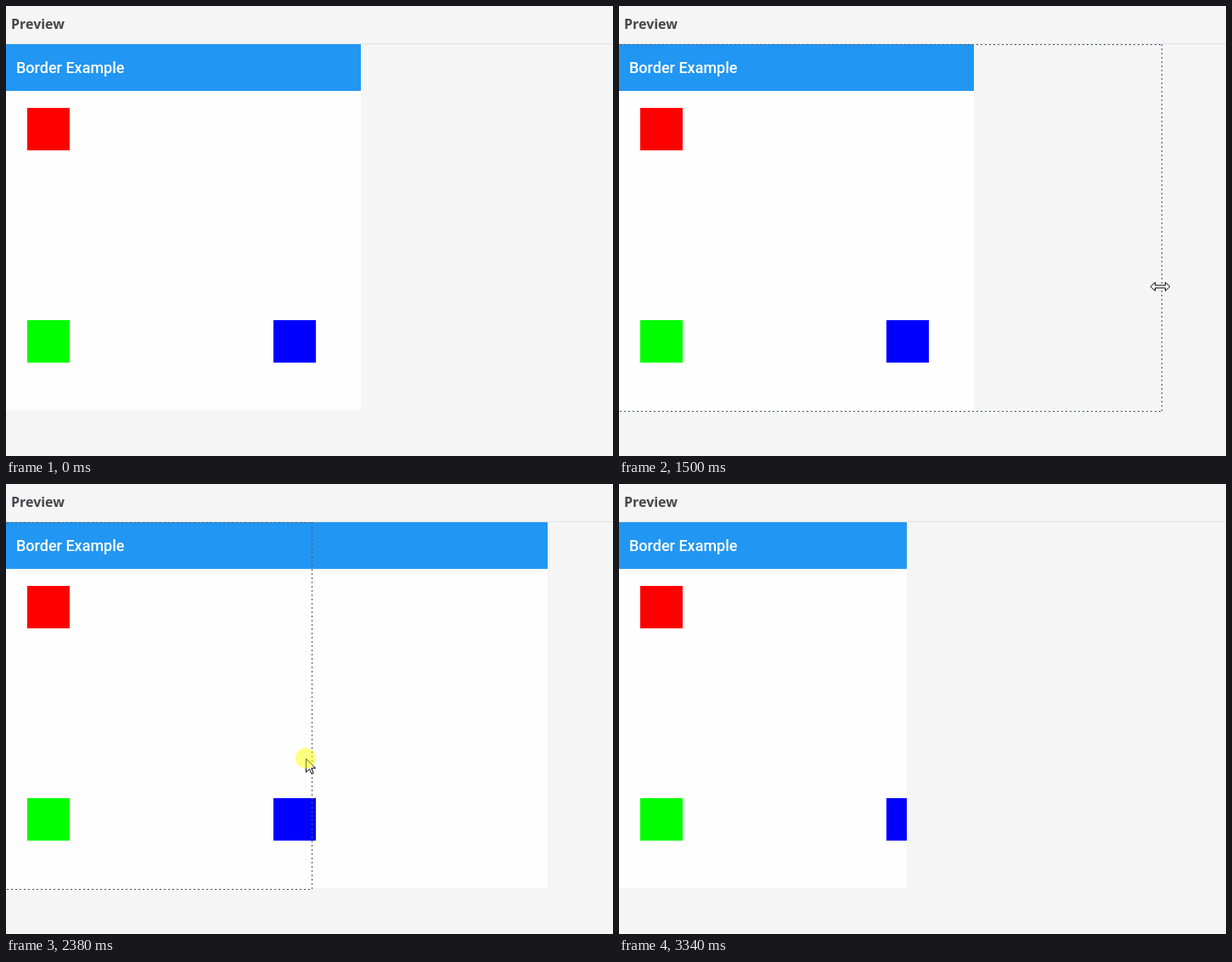
Animation of 715x530 px, one loop 3.94 s. Source, as an HTML page:

```html
<!DOCTYPE html>
<html lang="en">
<head>
<meta charset="utf-8">
<title>Preview</title>
<style>
  html, body { margin: 0; width: 100%; height: 100%; overflow: hidden; background: #f5f5f5; }
  #stage { position: relative; width: 715px; height: 530px; overflow: hidden; }
  #title {
    position: absolute; inset: 0 0 auto; height: 44px; padding-left: 6px;
    border-bottom: 1px solid #e2e2e2;
    font: bold 16px/42px "Open Sans", sans-serif; color: #46464c;
  }
  #panel {
    position: absolute; left: 0; top: 45px; height: 431px;
    overflow: hidden; background: #fefefe;
  }
  #bar {
    height: 55px; padding-left: 12px; background: #2196f3; color: #fff;
    font: 500 18px/55px Roboto, sans-serif; white-space: nowrap;
  }
  .box { position: absolute; width: 50px; height: 50px; }
  .red { left: 25px; top: 75px; background: #fe0000; }
  .green { left: 25px; top: 325px; background: #00fe00; }
  .blue { left: 315px; top: 325px; background: #0000fe; }
  svg { position: absolute; inset: 0; }
  #outline { fill: none; stroke: #46546e; stroke-dasharray: 2 3; shape-rendering: crispEdges; }
  #arrow, #resize { fill: #fff; stroke: #000; }
</style>
</head>
<body>
<div id="stage">
  <div id="title">Preview</div>
  <div id="panel">
    <div id="bar">Border Example</div>
    <div class="box red"></div>
    <div class="box green"></div>
    <div class="box blue"></div>
  </div>
  <svg width="715" height="530">
    <path id="outline"/>
    <g id="pointer">
      <path id="arrow" d="M.5 .5V16.5L4.5 12.8L7 18.5L9.2 17.6L6.8 11.8H11.5Z"/>
      <path id="resize" d="M-11 .5L-5.5-4.5V-1H6.5V-4.5L12 .5L6.5 5.5V2H-5.5V5.5Z"/>
      <circle id="press" r="12" fill="#ff0" fill-opacity=".5"/>
    </g>
  </svg>
</div>
<script>
  const LOOP = 3940;
  const SAMPLE = 67.7;
  const $ = id => document.getElementById(id);

  const easeIn = n => p => p ** n;
  const easeOut = n => p => 1 - (1 - p) ** n;
  const easeInOut = n => p => p < .5 ? (2 * p) ** n / 2 : 1 - (2 - 2 * p) ** n / 2;

  const entry = { x: 675, y: 532 };
  const moves = [
    { from: 0, to: 540, x: 425, y: 336, ease: easeOut(1.5) },
    { from: 540, to: 740, x: 417, y: 332, ease: easeOut(2) },
    { from: 1038, to: 1288, x: 637, y: 330, ease: easeInOut(3) },
    { from: 1970, to: 2170, x: 440, y: 320, ease: easeIn(2) },
    { from: 2170, to: 2590, x: 338, y: 323, ease: easeOut(3) },
    { from: 2930, to: 3340, x: 768, y: 608, ease: easeIn(2) }
  ];

  // The outline trails the pointer; the panel takes its width on drop.
  const drags = [
    { press: 940, start: 1038, release: 1500, drop: 1550, lag: 44, width: 638 },
    { press: 1970, start: 1970, release: 2730, drop: 2790, lag: 22, width: 339 }
  ];

  function pointerAt(t) {
    let { x, y } = entry;
    for (const move of moves) {
      const p = move.ease(Math.min(1, Math.max(0, (t - move.from) / (move.to - move.from))));
      x += (move.x - x) * p;
      y += (move.y - y) * p;
    }
    return { x: Math.round(x), y: Math.round(y) };
  }

  const show = (id, on) => $(id).setAttribute("visibility", on ? "visible" : "hidden");

  function draw(t) {
    const time = Math.floor((t + 10) / SAMPLE) * SAMPLE;
    const { x, y } = pointerAt(time);
    const width = drags.reduce((w, drag) => t >= drag.drop ? drag.width : w, 418);
    const drag = drags.find(d => time > d.start && t < d.drop);
    const edge = drag ? pointerAt(time - drag.lag).x + 2 : width;
    const resizing = Math.abs(x - edge) < 5;

    $("panel").style.width = width + "px";
    $("pointer").setAttribute("transform", `translate(${x} ${y})`);
    show("arrow", !resizing);
    show("resize", resizing);
    show("press", drags.some(d => t >= d.press && t < d.release));

    const right = edge + .5;
    $("outline").setAttribute("d", `M1 45.5H${right}M${right} 45V478M1 477.5H${right}`);
    show("outline", drag);
  }

  function tick() {
    draw(performance.now() % LOOP);
    requestAnimationFrame(tick);
  }
  tick();
</script>
</body>
</html>
```
